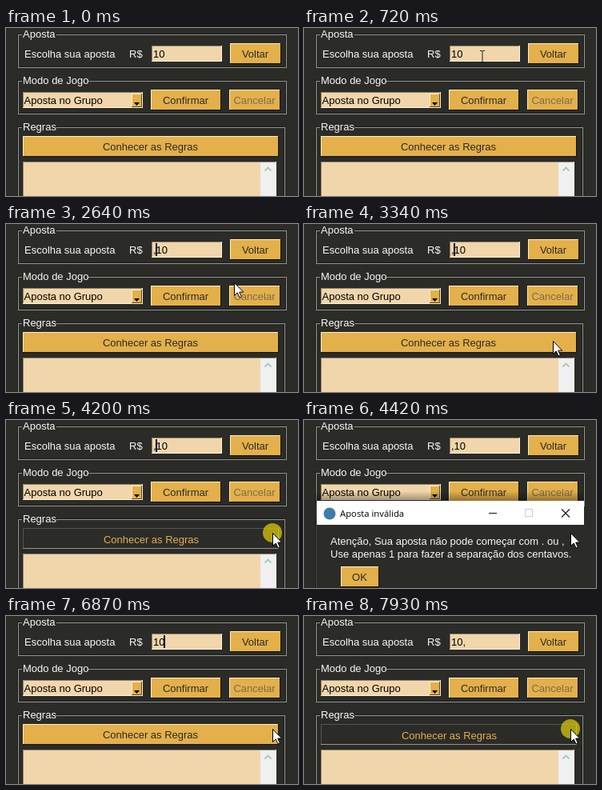
These frames come from a looping animation (365 px wide and 210 px high, 8000 ms). An HTML page:

```html
<!DOCTYPE html>
<html lang="pt">
<head>
<meta charset="utf-8">
<style>
  html, body { margin: 0; width: 100%; height: 100%; overflow: hidden; background: #2b2b28; }
  svg { display: block; width: 100%; height: 100%; }
  text { font: 13px "Liberation Sans", Arial, sans-serif; white-space: pre; }
  .title { font: 11.3px "Open Sans", "Noto Sans", sans-serif; }
  .label { text-anchor: middle; }
  rect, .line { shape-rendering: crispEdges; }
</style>
</head>
<body>
<svg id="stage" viewBox="0 0 365 210"></svg>
<script>
const BG = '#2b2b28', INK = '#f8f8f8', FIELD = '#f1d6ab', GOLD = '#e3b04b';
const LOOP = 8000;

const rect = (x, y, w, h, fill) =>
  `<rect x="${x}" y="${y}" width="${w}" height="${h}" fill="${fill}"/>`;
const text = (x, y, s, fill = INK, cls = '') =>
  `<text x="${x}" y="${y}" fill="${fill}" class="${cls}">${s}</text>`;
const stroke = (d, color, extra = 'class="line"') =>
  `<path d="${d}" fill="none" stroke="${color}" ${extra}/>`;

// Filled box with a light and a dark pair of edges.
function bevel(x, y, w, h, fill, topLeft, bottomRight) {
  return rect(x, y, w, h, bottomRight) + rect(x, y, w - 1, h - 1, topLeft) +
    rect(x + 1, y + 1, w - 2, h - 2, fill);
}
function button(x, y, w, label, ink = BG) {
  return bevel(x, y, w, 26, GOLD, '#fff0b8', '#1a1509') +
    text(x + w / 2 - .5, y + 18, label, ink, 'label');
}
// Groove: a light line with a dark one outside at top left, inside at bottom right.
function group(x, y, w, h, label, labelWidth) {
  const box = (i, color) => stroke(`M${x + i + .5} ${y + i + .5}h${w - 1}v${h - 1}h${1 - w}z`, color);
  return box(-1, '#1a1a18') + box(0, '#979794') +
    rect(x + 5, y - 5, labelWidth, 10, BG) + text(x + 6, y + 4, label);
}

const windowParts =
  rect(0, 0, 365, 210, BG) +
  group(15, 8, 336, 42, 'Aposta', 43) +
  text(23, 37, 'Escolha sua aposta') + text(154, 37, 'R$') +
  bevel(182, 22, 88, 20, FIELD, '#91816a', '#fff4dc') +
  button(280, 19, 64, 'Voltar') +
  group(15, 66, 336, 42, 'Modo de Jogo', 82) +
  bevel(21, 80, 150, 20, FIELD, '#91816a', '#fff4dc') +
  text(22.5, 95, 'Aposta no Grupo', '#000') +
  bevel(157, 82, 13, 17, GOLD, '#fff0b8', '#5b461e') +
  '<path d="M160 93h7l-3.5 4z" fill="#000"/>' +
  button(181, 77, 88, 'Confirmar') +
  button(279, 77, 64, 'Cancelar', '#7b6c4c') +
  group(15, 124, 334, 120, 'Regras', 43) +
  bevel(21, 167, 317, 60, FIELD, '#91816a', '#fff4dc') +
  rect(318, 168, 19, 50, '#f0f0f0') +
  stroke('M323.5 178.5l4-4 4 4', '#a3c9bb', 'stroke-width="1.8"');

const rulesButton = button(21, 135, 320, 'Conhecer as Regras');
const rulesPressed = bevel(21, 135, 320, 26, BG, '#555552', '#959593') +
  text(181.5, 154, 'Conhecer as Regras', GOLD, 'label');

const dialog =
  rect(15, 89, 335, 12, 'url(#shadow)') +
  rect(15, 101, 335, 120, '#4a4a48') + rect(16, 101, 334, 30, '#fff') +
  rect(16, 131, 334, 90, BG) +
  '<circle cx="32" cy="117" r="7.5" fill="#3d7cab"/>' +
  text(45, 121, 'Aposta inválida', '#000', 'title') +
  stroke('M231 116.5h10', '#111') +
  stroke('M276.5 111.5h9v9h-9z', '#ccc') +
  stroke('M322 111.5l10 10M332 111.5l-10 10', '#111', 'stroke-width="1.1"') +
  text(33, 155.5, 'Atenção, Sua aposta não pode começar com . ou ,') +
  text(33, 172, 'Use apenas 1 para fazer a separação dos centavos.') +
  button(46, 183, 48, 'OK');

const arrow = '<path d="M.5 .5v16l3.7-3.6 2.8 6 2.4-1-2.7-5.8h5z" fill="#fff" stroke="#000"/>';
const beam = stroke('M-3 -7.5h2.5l.5 .5 .5-.5h2.5M-3 7.5h2.5l.5-.5 .5 .5h2.5M0 -7v14', '#222', '');

// Pointer: time, x, y, easing of the way there.
const out = p => 1 - (1 - p) ** 2;
const inOut = p => p * p * (3 - 2 * p);
const linear = p => p;
const path = [
  [0, 324, 230, linear], [50, 324, 212, linear], [720, 223, 36, out], [830, 213, 36, out],
  [930, 213, 36, linear], [1390, 187, 33, inOut], [1520, 187, 33, linear],
  [1550, 185, 28, linear], [1630, 185, 28, linear], [1840, 283, 23, out],
  [2320, 283, 23, linear], [3120, 289, 165, inOut], [3340, 311, 146, out],
  [3930, 333, 141, out], [LOOP, 333, 141, linear]
];
// Hard changes: time, value.
const entry = [[0, '10'], [2160, ',10'], [6480, '10'], [7520, '10,']];
const caret = [
  [0, 0], [1550, 183], [2130, 0], [2160, 187], [2740, 0], [3050, 187], [3640, 0],
  [3930, 187], [4300, 0], [5380, 187], [5960, 0], [6270, 187], [6480, 183],
  [6740, 190], [6870, 197], [7160, 0], [7520, 201], [7750, 0]
];
const clicks = [[1550, 1630], [4150, 4240], [7930, LOOP]];
const OPEN = 4300, OPENED = 4420, CLOSED = 5380;

const valueAt = (steps, t) => steps.filter(s => s[0] <= t).pop()[1];

function pointerAt(t) {
  const i = path.findIndex(k => k[0] > t);
  const [t0, x0, y0] = path[i - 1], [t1, x1, y1, ease] = path[i];
  const p = ease((t - t0) / (t1 - t0));
  return [Math.round(x0 + (x1 - x0) * p), Math.round(y0 + (y1 - y0) * p)];
}

function dialogAt(t) {
  if (t < OPEN || t >= CLOSED) return '';
  const p = Math.min(1, .25 + .75 * (t - OPEN) / (OPENED - OPEN));
  if (p === 1) return dialog;
  const s = .9 + .1 * p;
  return `<g opacity="${p}" transform="translate(183 165) scale(${s}) translate(-183 -165)">${dialog}</g>`;
}

function pointer(t, pressed) {
  const [x, y] = pointerAt(t);
  const overEntry = x > 182 && x < 270 && y > 22 && y < 42;
  const halo = pressed
    ? `<circle cx="${x}" cy="${y}" r="12" fill="#dccd0a" opacity=".72"/>` : '';
  return `${halo}<g transform="translate(${x} ${y})">${overEntry ? beam : arrow}</g>`;
}

const stage = document.getElementById('stage');
stage.innerHTML =
  `<linearGradient id="shadow" x2="0" y2="1">
    <stop stop-opacity="0"/><stop offset="1" stop-opacity=".35"/>
  </linearGradient>` + windowParts + '<g id="live"></g>';
const live = document.getElementById('live');

function draw(t) {
  const pressed = clicks.some(([a, b]) => t >= a && t < b);
  const caretX = valueAt(caret, t);
  live.innerHTML =
    (pressed && t > 4000 ? rulesPressed : rulesButton) +
    text(184, 37, valueAt(entry, t), '#000') +
    (caretX ? rect(caretX, 24, 2, 16, '#000') : '') +
    dialogAt(t) + pointer(t, pressed);
}

const start = performance.now();
function tick() {
  draw((performance.now() - start) % LOOP);
  requestAnimationFrame(tick);
}
draw(0);
requestAnimationFrame(tick);
</script>
</body>
</html>
```
